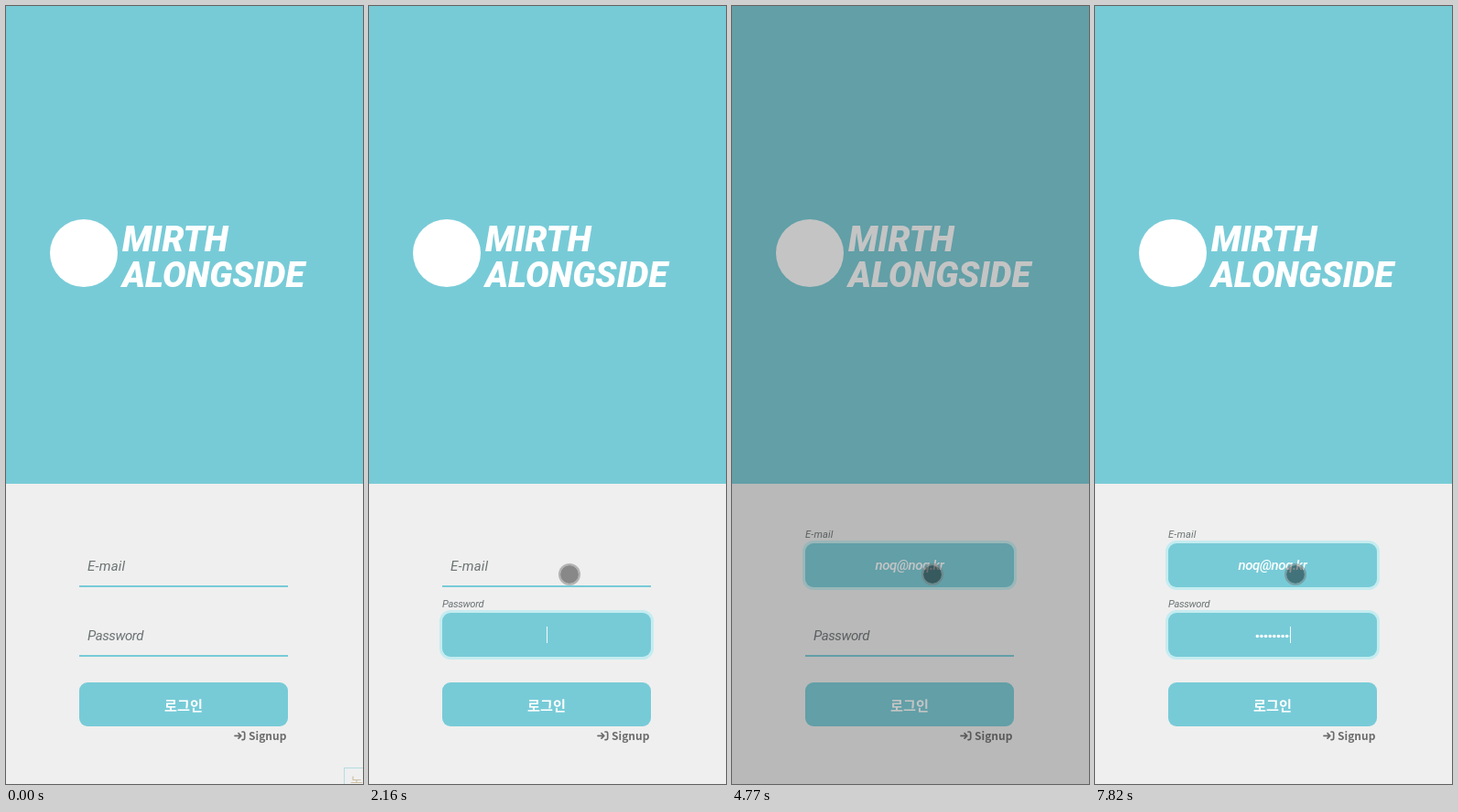
Write an HTML page that moves like this. It is 390x850 px and loops after 8 s.

```html
<!DOCTYPE html>
<html lang="ko">
<head>
<meta charset="utf-8">
<title>Login</title>
<style>
@property --f { syntax: "<number>"; inherits: true; initial-value: 0; }

:root { --teal: #77cbd7; --glow: #c5ecf0; --dur: 8s; }
html, body { margin: 0; width: 100%; height: 100%; overflow: hidden; background: #efefef; }
body { position: relative; font: italic 500 15px/20px Roboto, sans-serif; letter-spacing: -.4px; }
body div, body svg { position: absolute; box-sizing: border-box; white-space: nowrap; }

.hero { inset: 0 0 auto; height: 522px; background: var(--teal); }
.hero svg { left: 0; top: 0; fill: #fff; font: italic 900 38px Roboto, sans-serif; letter-spacing: 0; }

/* --f runs from 0 (idle) to 1 (focused) */
.field { left: 80px; width: 228px; height: 48px; animation: var(--dur) ease infinite; }
.email { top: 587px; animation-name: email; }
.pass { top: 663px; animation-name: pass; }
.box {
  inset: 0;
  border-bottom: calc(2px * (1 - var(--f))) solid var(--teal);
  border-radius: calc(9px * var(--f));
  background: rgb(119 203 215 / calc(var(--f) * var(--f)));
  box-shadow: 0 0 0 calc(3px * var(--f)) rgb(197 236 240 / var(--f));
}
.label {
  left: 9px; top: 15px; color: #6c7373; font-weight: 400; transform-origin: 0 0;
  transform: translate(calc(-9px * var(--f)), calc(-32.4px * var(--f))) scale(calc(1 - .26 * var(--f)));
}
.email .label { letter-spacing: .2px; }
.value {
  inset: 14px 0 auto; height: 20px; color: #fff;
  display: flex; justify-content: center; align-items: center;
}
.caret { width: 1px; height: 18px; margin-right: -1px; background: #fff; }
.dots {
  width: calc(4.64px * var(--n, 0)); height: 5px; margin-top: 2px;
  background: radial-gradient(circle, #fff 1.5px, transparent 2.1px) 0 0 / 4.64px 5px;
}

.login, .notice, .signup, .tip { font: 700 15.2px/22px "Noto Sans CJK KR", "Noto Sans CJK", sans-serif; letter-spacing: 0; }
.login, .notice { text-align: center; }
.login { left: 80px; top: 739px; width: 228px; height: 48px; line-height: 48px; border-radius: 9px; background: var(--teal); color: #fff; font-weight: 900; }
.signup { left: 265px; top: 787px; font-size: 12px; line-height: 20px; color: #6c6c6c; }
.enter { left: 249px; top: 792px; fill: none; stroke: #6c6c6c; stroke-width: 1.7; stroke-linecap: round; stroke-linejoin: round; }

.tip {
  left: 369px; top: 832px; width: 50px; height: 30px; padding: 3px 6px;
  border: 1px solid #b4dce1; color: #cfc3a6; font-weight: 400;
  animation: tip var(--dur) step-end infinite;
}

.dim { inset: 0; background: rgb(45 45 45 / .28); animation: dim var(--dur) step-end infinite; }
.sheet { left: 8px; top: 699px; width: 372.5px; height: 170px; border-radius: 13px; background: #fff; animation: sheet var(--dur) infinite; }
.cross { left: 177px; top: 27px; stroke: #d9955f; stroke-width: 2.6; }
.notice { left: 0; right: 0; top: 65px; color: #333; }
.close { left: 226.5px; top: 99px; width: 101.5px; height: 31px; border: 3px solid var(--glow); border-radius: 16px; line-height: 26px; text-align: center; color: #333; }

.pointer {
  left: -12px; top: -12px; width: 24px; height: 24px; border-radius: 50%;
  border: 2px solid rgb(120 120 120 / .5);
  background: rgb(0 0 0 / .43); background-clip: padding-box;
  animation: pointer var(--dur) linear infinite;
}

@keyframes email {
  0%, 8.5% { --f: 0; }
  11.9%, 21.25% { --f: 1; }
  25%, 28.4% { --f: 0; }
  32.1%, 100% { --f: 1; }
}
@keyframes pass {
  0%, 21.25% { --f: 0; }
  25%, 28.4% { --f: 1; }
  32.1%, 78% { --f: 0; }
  82.75%, 100% { --f: 1; }
}
@keyframes pointer {
  0%, .8% { transform: translate(412px, 850px); }
  5% { transform: translate(300px, 690px); }
  8.5% { transform: translate(240px, 614px); }
  11.9%, 16.8% { transform: translate(357px, 638px); }
  18.5% { transform: translate(295px, 665px); }
  21.25% { transform: translate(232px, 690px); }
  23.5% { transform: translate(224px, 686px); }
  27%, 100% { transform: translate(219px, 621px); }
}
@keyframes tip { 0% { opacity: 1; } .87%, 100% { opacity: 0; } }
@keyframes dim { 0% { opacity: 0; } 59.4% { opacity: 1; } 68.2%, 100% { opacity: 0; } }
@keyframes sheet {
  0%, 60.9% { transform: translateY(152px); animation-timing-function: ease-out; }
  65.7%, 68.19% { transform: none; }
  68.2%, 100% { transform: translateY(152px); }
}
</style>
</head>
<body>
<div class="hero">
  <svg width="390" height="522">
    <circle cx="85" cy="270" r="37"/>
    <text x="127" y="268">MIRTH</text>
    <text x="127" y="307">ALONGSIDE</text>
  </svg>
</div>

<div class="field email">
  <div class="box"></div>
  <div class="label">E-mail</div>
  <div class="value"><span id="mail"></span><span class="caret" id="mailCaret"></span></div>
</div>
<div class="field pass">
  <div class="box"></div>
  <div class="label">Password</div>
  <div class="value"><span class="dots" id="dots"></span><span class="caret" id="passCaret"></span></div>
</div>

<div class="login">로그인</div>
<svg class="enter" width="13" height="11"><path d="M1 5.3H7.5M5 2.5L7.8 5.3L5 8.1M9 1H10.2Q11.7 1 11.7 2.5V8.1Q11.7 9.6 10.2 9.6H9"/></svg>
<div class="signup">Signup</div>
<div class="tip">녹화</div>

<div class="dim"></div>
<div class="sheet">
  <svg class="cross" width="18" height="18"><path d="M1 1L17 17M17 1L1 17"/></svg>
  <div class="notice">비밀번호를 입력해주세요!</div>
  <div class="close">close</div>
</div>
<div class="pointer" id="pointer"></div>

<script>
const LOOP = 8000;
const LEAD = 25; // input lands just before the frame that shows it
const ADDRESS = "noq@noq.kr";
// [time, characters typed]
const MAIL_KEYS = [[3310, 1], [3440, 2], [3640, 3], [3840, 4], [4170, 5], [4270, 6], [4370, 7], [4510, 9], [4640, 10]];
const PASS_KEYS = [[7220, 1], [7320, 2], [7420, 3], [7520, 4], [7620, 6], [7720, 7], [7820, 8]];
// [from, to] while the caret shows
const MAIL_CARET = [[700, 1210], [2290, 2770], [3310, 4770]];
const PASS_CARET = [[1710, 2210], [6340, 6820], [7220, LOOP + LEAD]];

const [mail, mailCaret, dots, passCaret, pointer] =
  ["mail", "mailCaret", "dots", "passCaret", "pointer"].map(id => document.getElementById(id));

const typed = (keys, t) => keys.reduce((n, [at, count]) => t >= at ? count : n, 0);
const blink = (el, spans, t) => {
  el.style.opacity = spans.some(([a, b]) => t >= a && t < b) ? .9 : 0;
};

// Share the clock of the CSS animations
const clock = pointer.getAnimations()[0];

function draw(now) {
  const t = (clock?.currentTime ?? now) % LOOP + LEAD;
  mail.textContent = ADDRESS.slice(0, typed(MAIL_KEYS, t));
  dots.style.setProperty("--n", typed(PASS_KEYS, t));
  blink(mailCaret, MAIL_CARET, t);
  blink(passCaret, PASS_CARET, t);
  requestAnimationFrame(draw);
}
requestAnimationFrame(draw);
</script>
</body>
</html>
```
